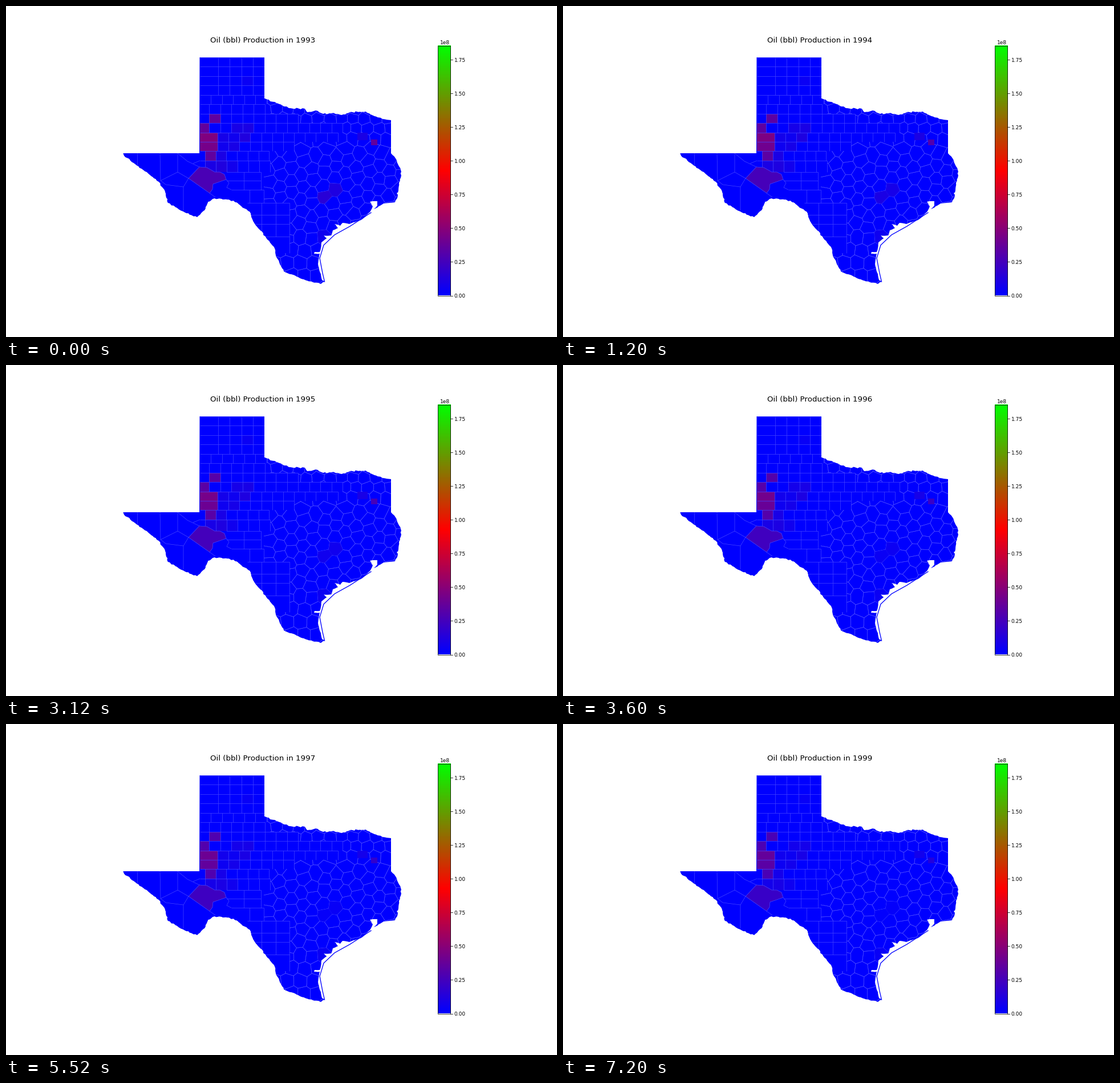
These frames come from a looping animation (966x580 px, 8000 ms). A matplotlib script:

```python
import numpy as np
import matplotlib.pyplot as plt
from matplotlib.animation import FuncAnimation
from matplotlib.collections import LineCollection
from matplotlib.patches import Polygon

W, H, DPI = 966, 580, 64
PX = 72 / DPI                      # points per pixel
BLUE, SEAM = "#0000ff", "#4a4aff"
VMAX = 1.852                       # top of the scale, in 1e8 barrels
FIRST_YEAR, YEARS, FRAMES_PER_YEAR = 1993, 7, 3

plt.rcParams["font.family"] = "DejaVu Sans"
cmap = plt.get_cmap("brg")
rng = np.random.default_rng(4)


def rough(points, amp=1.0, step=3.5):
    """Break a river line into small seeded wiggles."""
    out = []
    for a, b in zip(points, points[1:]):
        a, b = np.array(a, float), np.array(b, float)
        parts = max(1, round(np.hypot(*(b - a)) / step))
        out.append(tuple(a))
        for t in np.arange(1, parts) / parts:
            out.append(tuple(a + (b - a) * t + rng.uniform(-amp, amp, 2)))
    return out + [points[-1]]


def box(x0, y0, x1, y1):
    return [(x0, y0), (x1, y0), (x1, y1), (x0, y1)]


# State border, clockwise from the western tip
RED_RIVER = [
    (453, 162), (463, 167), (474, 170), (484, 174), (498, 179), (524, 180),
    (528, 186), (543, 183), (556, 189), (570, 188), (588, 191), (603, 186),
    (631, 185), (646, 193), (660, 198), (675, 200)]
SABINE = [
    (675, 258), (683, 267), (692, 287), (693, 297), (689, 310), (688, 323),
    (685, 328), (687, 333), (682, 344)]
GULF = [
    (662, 346), (645, 356), (651, 350), (651, 342), (645, 342), (638, 343),
    (643, 351), (638, 361), (624, 374), (602, 382), (590, 380), (586, 385),
    (576, 382), (582, 389), (573, 393), (570, 402), (557, 402), (562, 407),
    (553, 414), (552, 424), (550, 431), (541, 431), (540, 434), (550, 434),
    (547, 452), (554, 480)]
RIO_GRANDE = [
    (559, 483), (551, 487), (522, 479), (487, 465), (474, 440), (470, 422),
    (437, 383), (427, 360), (399, 341), (366, 337), (354, 343), (348, 358),
    (335, 370), (316, 363), (284, 345), (279, 325), (268, 308), (224, 275),
    (207, 262)]
BARRIER = [
    (640, 362), (603, 386), (576, 401), (557, 419), (550, 442), (555, 468),
    (558.5, 483)]
BORDER = ([(205.5, 258), (339, 258), (339.5, 90), (453, 90)]
          + rough(RED_RIVER, 1.3) + rough(SABINE) + rough(GULF, 0.5)
          + rough(RIO_GRANDE))

# Right-angled counties: first inner column line, step and count per row
TOP, ROW = 90, 16.44
COLUMNS = 4 * [(372, 20.25, 5)] + [
    (359, 19.5, 6), (356, 19.5, 6), (356, 19.5, 9), (356, 19.5, 13),
    (371, 19.15, 12), (371, 19.15, 8)]
bands = [(TOP + ROW * k, TOP + ROW * (k + 1), 340, *cols)
         for k, cols in enumerate(COLUMNS)]
bands += [
    (254.4, 271, 340, 349, 18.7, 7), (271, 291, 340, 349, 19, 7),
    (291, 306, 387, 417, 30, 2), (306, 322, 387, 417, 30, 2),
    (322, 345, 395, 427, 25, 2), (345, 366, 423, 448, 24.5, 3),
    (366, 382, 430, 448, 24.5, 3), (382, 404, 437, 448, 24.5, 3),
    (404, 433, 452, 497, 0, 1)]

PECOS = [
    (320, 302), (339, 282), (352, 283), (361, 288), (366, 291), (375, 291),
    (383, 295), (386, 304), (363, 312), (362, 321), (357, 328)]
FAR_WEST = [
    [(230, 258), (230, 279)], [(270, 258), (271, 306), (301, 291)],
    [(301, 258), (301, 291), (320, 302), (311, 317), (311, 358)],
    [(271, 306), (280, 313), (311, 317)],
    [(302, 259), (318, 272), (339, 282)], [(328, 276), (340, 271)],
    [(386, 304), (391, 310), (387, 318), (395, 322)],
    [(357, 328), (367, 335)]]


def lattice(x0, y0, x1, y1, dx, dy, tilt, jitter):
    """County centres on a tilted, slightly shaken brick pattern."""
    c, s = np.cos(np.radians(tilt)), np.sin(np.radians(tilt))
    mid = np.array([(x0 + x1) / 2, (y0 + y1) / 2])
    sites = []
    for j in range(-12, 13):
        for i in range(-14, 15):
            u, v = (i + 0.35 * (j % 2)) * dx, j * dy
            p = mid + (c * u + s * v, c * v - s * u)
            p += rng.uniform(-jitter, jitter, 2)
            if x0 <= p[0] <= x1 and y0 <= p[1] <= y1:
                sites.append(p)
    return sites


def nearer_side(poly, a, b):
    """Keep the part of poly that is closer to a than to b."""
    n = b - a
    d = (poly - (a + b) / 2) @ n
    out = []
    for i in range(len(poly)):
        j = (i + 1) % len(poly)
        if d[i] <= 0:
            out.append(poly[i])
        if d[i] * d[j] < 0:
            out.append(poly[i] + (poly[j] - poly[i]) * d[i] / (d[i] - d[j]))
    return np.array(out)


def county_cells(sites):
    sites = np.array(sites)
    cells = []
    for a in sites:
        cell = a + 80.0 * np.array(box(-1, -1, 1, 1))
        order = np.argsort(((sites - a) ** 2).sum(1))
        for b in sites[order[1:30]]:
            cell = nearer_side(cell, a, b)
        cells.append(cell)
    return sites, cells


sites, cells = county_cells(
    lattice(445, 150, 690, 246, 20, 17, 0, 2)
    + lattice(455, 247, 700, 400, 23, 18, 30, 3)
    + lattice(460, 402, 570, 500, 22, 22, 0, 2))


def cell_at(x, y):
    return cells[np.argmin(((sites - (x, y)) ** 2).sum(1))]


def band_cell(row, col):
    top, bottom, left, first, step, _ = bands[row]
    x0 = left if col == 0 else first + (col - 1) * step
    return box(x0, top, first + col * step, bottom)


# Shape, first yearly output in 1e8 barrels, share left in the last year
SLOW = 0.77
EAST_OUTPUT = [
    (box(640, 234, 651, 244), 0.36, 0.36),
    (box(616, 222, 634, 235), 0.10, 0.7),
    (cell_at(567, 336), 0.15, 0.07),
    (cell_at(578, 314), 0.11, 0.18),
    (cell_at(558, 398), 0.06, 0.5)]
WEST_OUTPUT = [
    (band_cell(row, col), start, SLOW) for row, col, start in [
        (8, 0, 0.47), (9, 0, 0.43), (7, 0, 0.36), (6, 1, 0.35),
        (10, 1, 0.35), (7, 3, 0.09), (7, 4, 0.10), (8, 1, 0.08),
        (8, 2, 0.06), (8, 3, 0.12), (9, 1, 0.06), (9, 2, 0.09),
        (11, 1, 0.10), (10, 2, 0.10), (11, 2, 0.12), (11, 3, 0.07),
        (2, 3, 0.04)]]

fig = plt.figure(figsize=(W / DPI, H / DPI), dpi=DPI, facecolor="white")
ax = fig.add_axes([0, 0, 1, 1])
ax.axis("off")

state = ax.add_patch(Polygon(BORDER, fc=BLUE, ec="none", zorder=1))
wells = []


def add_area(shape, z):
    patch = ax.add_patch(Polygon(shape, fc=BLUE, ec="none", zorder=z))
    patch.set_clip_path(state)
    return patch


def add_counties(output, z):
    for shape, start, share in output:
        wells.append((add_area(shape, z), start, share))


def add_seams(lines, z):
    seams = LineCollection(lines, colors=SEAM, linewidths=0.65 * PX, zorder=z)
    ax.add_collection(seams, autolim=False)
    seams.set_clip_path(state)


add_counties(EAST_OUTPUT, 3)
add_seams([np.vstack([c, c[:1]]) for c in cells], 2)

grid = []
for top, bottom, left, first, step, count in bands:
    columns = first + step * np.arange(count)
    add_area(box(left, top, columns[-1], bottom), 4)
    grid.append([(left, top), (columns[-1], top)])
    grid += [[(x, top), (x, bottom)] for x in columns]
add_area(box(200, 255, 452, 345), 4)
add_counties(WEST_OUTPUT, 5)
add_seams(grid + FAR_WEST, 6)
add_counties([(PECOS, 0.27, SLOW)], 7)
add_seams([PECOS + PECOS[:1]], 8)
ax.plot(*zip(*BARRIER), color=BLUE, lw=1.3 * PX, zorder=9)

# Colour scale
X0, X1, Y0, Y1 = 757, 779.3, 70, 507.5
ax.imshow(np.linspace(1, 0, 256)[:, None], cmap=cmap, aspect="auto",
          extent=(X0, X1, Y1, Y0), interpolation="nearest", zorder=2)
ax.add_patch(Polygon(box(X0, Y0, X1, Y1), fc="none", ec="black",
                     lw=0.75 * PX, zorder=3))
for k in range(8):
    y = Y1 - k * 0.25 / VMAX * (Y1 - Y0)
    ax.plot([X1, X1 + 3.2], [y, y], color="black", lw=0.75 * PX)
    ax.text(X1 + 6.3, y, f"{k * 0.25:.2f}", size=8.95 * PX,
            va="center_baseline")
ax.text(770, 67.2, "1e8", size=8.95 * PX, ha="center", va="baseline")
title = ax.text(450.5, 64.3, "", size=13.42 * PX, ha="center", va="baseline")
ax.set_xlim(0, W)
ax.set_ylim(H, 0)


def draw(frame):
    year = frame // FRAMES_PER_YEAR
    title.set_text(f"Oil (bbl) Production in {FIRST_YEAR + year}")
    for patch, start, share in wells:
        output = start * share ** (year / (YEARS - 1))
        patch.set_facecolor(cmap(output / VMAX))
    return [title]


anim = FuncAnimation(fig, draw, frames=20, interval=400, repeat=True,
                     repeat_delay=0, blit=False)
plt.show()
```
